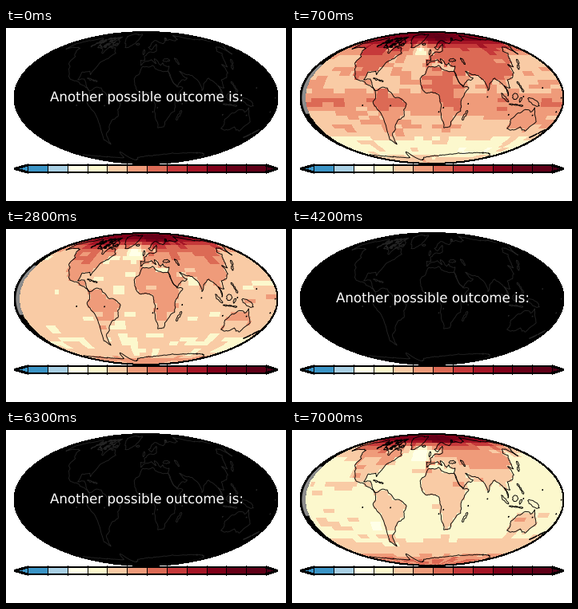
A matplotlib script for the animation above (8 s loop, 350x217 px).

```python
import numpy as np
import matplotlib.pyplot as plt
from matplotlib.animation import FuncAnimation
from matplotlib.collections import LineCollection
from matplotlib.colors import ListedColormap
from matplotlib.patches import Ellipse, Polygon
from matplotlib.path import Path

plt.rcParams["text.hinting"] = "no_hinting"

W, H, DPI = 350, 217, 100
CX, CY, RX, RY = 175, 87.5, 164.5, 82.5
PX = 72 / DPI
STEP = 100
COLORS = ["#3a94c6", "#a9d0e4", "#ffffe8", "#fcf8cd", "#f9cba5", "#ef9b7a",
          "#dc6a55", "#c6393a", "#a51526", "#800019", "#680018", "#600018"]

# Key corners (lon, lat); the coast between them is broken up at random
NORTH_AMERICA = [
    (-167, 66), (-163, 58), (-150, 60), (-137, 59), (-124, 48), (-124, 40),
    (-115, 30), (-105, 20), (-92, 15), (-79, 8), (-84, 15), (-88, 21), (-97, 20),
    (-95, 29), (-84, 30), (-81, 26), (-76, 36), (-65, 45), (-56, 52), (-65, 60),
    (-77, 62), (-80, 52), (-94, 59), (-84, 68), (-125, 70), (-157, 71)]
SOUTH_AMERICA = [
    (-78, 8), (-62, 11), (-50, 0), (-35, -7), (-40, -21), (-57, -36), (-66, -46),
    (-68, -55), (-75, -49), (-71, -20), (-81, -5), (-77, 3)]
AFRICA = [
    (-6, 35), (-17, 21), (-13, 9), (-7, 5), (8, 4), (13, -8), (18, -34), (27, -33),
    (40, -15), (40, -3), (51, 11), (43, 12), (33, 30), (19, 31), (10, 37)]
ASIA = [
    (33, 30), (44, 13), (59, 22), (50, 30), (67, 25), (77, 8), (81, 16), (90, 22),
    (98, 16), (104, 2), (101, 13), (108, 11), (107, 20), (121, 28), (120, 38),
    (126, 35), (129, 41), (141, 52), (137, 55), (157, 61), (157, 51), (163, 59),
    (179, 64), (179, 69), (140, 72), (104, 77), (72, 72), (44, 67)]
EUROPE = [
    (40, 66), (27, 71), (13, 66), (5, 60), (12, 57), (18, 62), (24, 65), (22, 60),
    (20, 55), (9, 54), (-3, 48), (-2, 43), (-9, 43), (-8, 37), (3, 42), (9, 44),
    (16, 39), (14, 45), (23, 37), (27, 40), (28, 37), (36, 36)]
AUSTRALIA = [(114, -24), (130, -13), (138, -16), (142, -11), (153, -27),
             (148, -38), (135, -33), (116, -35)]
GREENLAND = [(-70, 78), (-53, 68), (-44, 60), (-22, 71), (-15, 81), (-40, 83)]

# Island chains and inland seas: start, end, pieces, width / length
CHAINS = [
    ((131, 32), (144, 45), 2, .25), ((95, 5), (106, -6), 1, .2),
    ((106, -7), (126, -9), 3, .2), ((120, 18), (126, 6), 3, .5),
    ((131, -1), (150, -10), 1, .3), ((110, 0), (118, 3), 1, .9),
    ((120, -5), (123, 1), 1, .4), ((167, -46), (178, -36), 2, .3),
    ((44, -25), (50, -13), 1, .3), ((-5, 50), (-3, 58), 1, .4),
    ((-84, 22), (-68, 18), 2, .2), ((-64, 63), (-84, 73), 1, .3),
    ((53, 71), (66, 76), 1, .2), ((-23, 65), (-14, 65), 1, .35),
    ((28, 43), (41, 43), 1, .3), ((49, 46), (53, 37), 1, .4)]

rng = np.random.default_rng(7)


def project(lon, lat):
    """Mollweide projection to stage pixels."""
    t = np.linspace(-np.pi / 2, np.pi / 2, 4001)
    s = np.clip((2 * t + np.sin(2 * t)) / np.pi, -1, 1)
    th = np.interp(np.sin(np.radians(lat)), s, t)
    return CX + RX * np.asarray(lon) / 180 * np.cos(th), CY - RY * np.sin(th)


def rough(pts, rounds=3, amp=.15):
    """Close an outline and break up its sides by midpoint displacement."""
    p = np.vstack([pts, pts[:1]]).astype(float)
    for _ in range(rounds):
        d = np.diff(p, axis=0)
        mid = p[:-1] + d / 2
        mid += np.c_[-d[:, 1], d[:, 0]] * rng.uniform(-amp, amp, (len(d), 1))
        out = np.empty((len(p) + len(mid), 2))
        out[::2], out[1::2] = p, mid
        p = out
    return p


def blob(a, b, ratio):
    """Rough oval stretched from a to b."""
    a, b = np.array(a, float), np.array(b, float)
    d = (b - a) / 2
    u = np.linspace(0, 2 * np.pi, 9)[:-1, None]
    oval = (a + b) / 2 + d * np.cos(u) + np.array([-d[1], d[0]]) * ratio * np.sin(u)
    return rough(oval, rounds=1, amp=.3)


def chain(a, b, n, ratio):
    ends = np.linspace(a, b, n + 1)
    return [blob(p, p + .9 * (q - p), ratio) for p, q in zip(ends, ends[1:])]


def bump(x, mid, width):
    return np.exp(-((x - mid) / width) ** 2)


def rise(x, mid, width):
    return 1 / (1 + np.exp(-(x - mid) / width))


continents = [rough(p) for p in (NORTH_AMERICA, SOUTH_AMERICA, AFRICA,
                                 ASIA + EUROPE, AUSTRALIA, GREENLAND)]
shores = continents + [isle for c in CHAINS for isle in chain(*c)]

for _ in range(26):      # Arctic islands and lakes
    p = rng.uniform((-122, 60), (-68, 77))
    shores.append(blob(p, p + rng.uniform((2, -2), (9, 2)), .3))
for _ in range(12):      # scattered ocean islands
    p = rng.uniform((-160, -25), (179, 15))
    shores.append(blob(p, p + .9, .6))

lon = np.linspace(-172, 179, 120)
antarctic = (-71.5 + 4 * np.sin(np.radians(lon - 20)) + 11 * bump(lon, -62, 6)
             - 5 * bump(lon, -42, 14) - 6 * bump(lon, 180, 18)
             + rng.normal(0, .4, lon.size))
shores.append(np.c_[lon, antarctic])
lines = [np.c_[project(*s.T)] for s in shores]

# 5 degree grid, a little short of the western edge
LON0 = -172.5
lon_e = np.r_[LON0, np.arange(-170, 181, 5)]
lat_e = np.arange(-90, 91, 5)
glon, glat = np.meshgrid((lon_e[1:] + lon_e[:-1]) / 2, lat_e[:-1] + 2.5)
cells = np.c_[glon.ravel(), glat.ravel()]
land = np.any([Path(c).contains_points(cells) for c in continents], axis=0)
land = land.reshape(glon.shape)

polar = 1 - rise(glat, 66, 3)
warm = (4.3 + bump(glat, -5, 11) + 5 * rise(glat, 65, 5)
        - 1.1 * rise(-glat, 46, 1.5) + .9 * rise(-glat, 73, 2)
        - .6 * bump(glon, 80, 50) * bump(glat, -65, 9)
        + land * polar * (.5 + rise(glat, 15, 7)))
mild = (3.15 + 6 * rise(glat, 68, 4) + .9 * rise(-glat, 48, 3)
        + 1.6 * rise(-glat, 70, 3)
        + .7 * bump(glon, -130, 30) * bump(glat, 15, 6)
        + land * polar * (.9 + .6 * rise(glat, 35, 6)))
# Cool spot in the north Atlantic, hot spot around the Barents Sea
spots = (1.8 * bump(glon, 35, 45) * bump(glat, 78, 10)
         - 2.6 * bump(glon, -22, 13) * bump(glat, 56, 10)
         + .8 * bump(glon, -95, 30) * bump(glat, 68, 8))


def field(mix, seed):
    """Colour level per cell; mix runs from mild (0) to warm (1)."""
    r = np.random.default_rng(seed).normal(0, .22, (36, 24))
    r = (r + np.roll(r, 1, 1) + np.roll(r, 1, 0)) / 1.7
    v = mix * warm + (1 - mix) * mild + spots
    v += np.repeat(r, 3, axis=1)[:, -v.shape[1]:]
    return np.clip(np.round(v), 2, 11)


fig = plt.figure(figsize=(W / DPI, H / DPI), dpi=DPI, facecolor="white")
ax = fig.add_axes([0, 0, 1, 1])
ax.set(xlim=(0, W), ylim=(H, 0))
ax.axis("off")


def globe(**style):
    ax.add_patch(Ellipse((CX, CY), 2 * RX, 2 * RY, ec="black", lw=PX,
                         antialiased=False, **style))


globe(fc="black")
globe(fc="none", zorder=5)
la = np.linspace(-18, 38, 30)
west = np.c_[project(np.r_[np.full(30, -178.), np.full(30, LON0)], np.r_[la, la[::-1]])]
gap = ax.add_patch(Polygon(west, fc="#8c8c8c", ec="none", zorder=2))

mx, my = project(*np.meshgrid(lon_e, lat_e))
cmap = ListedColormap(COLORS)
maps = [ax.pcolormesh(mx, my, field(mix, seed), cmap=cmap, vmin=-.5, vmax=11.5, zorder=3)
        for mix, seed in ((1, 3), (.5, 11), (.75, 19), (0, 27))]
coast = LineCollection(lines, lw=.9 * PX, zorder=4)
ax.add_collection(coast, autolim=False)
label = ax.text(176, 92, "Another possible outcome is:", color="white", size=12,
                family="DejaVu Sans", ha="center", va="baseline", zorder=6)

# Colour bar
TOP, BOTTOM, LEFT, RIGHT = 172, 181, 27, 325
MID = (TOP + BOTTOM) / 2
edges = np.linspace(LEFT, RIGHT, 13)
for x0, x1, c in zip(edges, edges[1:], COLORS):
    ax.fill([x0, x1, x1, x0], [TOP, TOP, BOTTOM, BOTTOM], color=c, lw=0)
ax.fill([11, LEFT, LEFT], [MID, TOP, BOTTOM], color=COLORS[0], lw=0)
ax.fill([339, RIGHT, RIGHT], [MID, TOP, BOTTOM], color="#4d0018", lw=0)
ax.add_patch(Polygon([(11, MID), (LEFT, TOP), (RIGHT, TOP), (339, MID),
                      (RIGHT, BOTTOM), (LEFT, BOTTOM)], fc="none", ec="black",
                     lw=2 * PX, antialiased=False, zorder=5))
ax.vlines(edges, TOP - 2, BOTTOM + 1, color="black", lw=PX, antialiased=False, zorder=5)


def update(i):
    phase = i * STEP % 2100
    scene = i * STEP // 2100
    titled = phase < 700
    label.set_visible(titled)
    gap.set_visible(not titled)
    coast.set_color("#242424" if titled else "black")
    for k, m in enumerate(maps):
        m.set_visible(not titled and k == scene)
    return [label, gap, coast, *maps]


anim = FuncAnimation(fig, update, frames=80, interval=STEP, repeat=True,
                     repeat_delay=0, blit=False)
plt.show()
```
